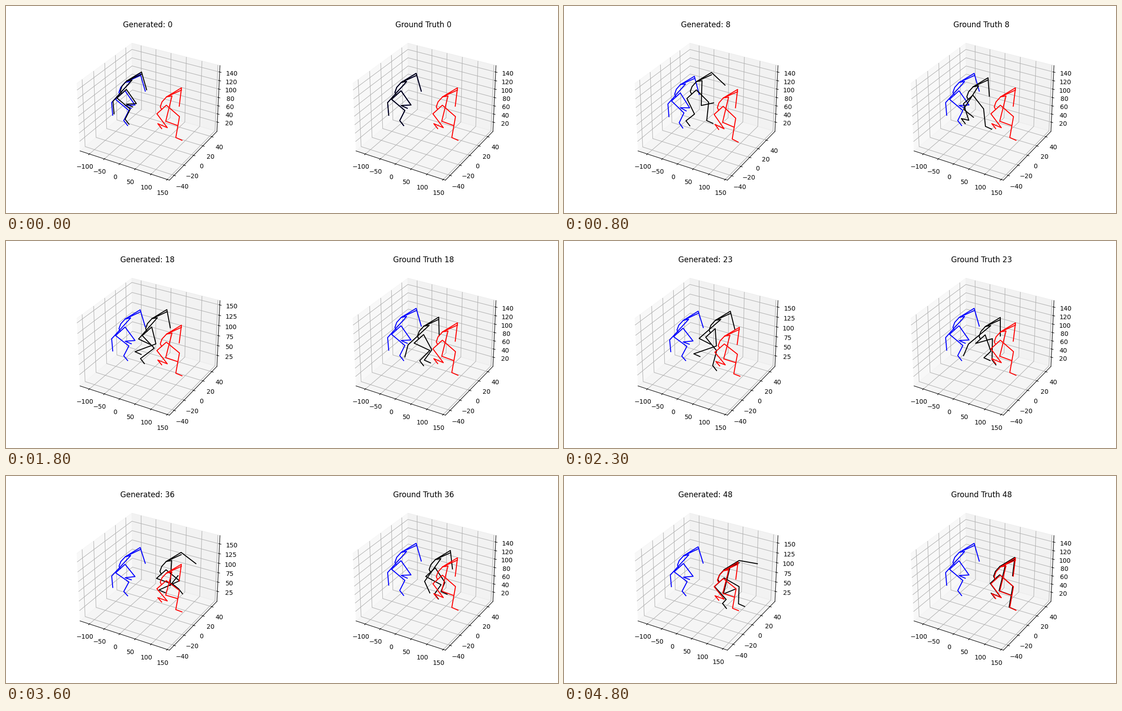
These frames come from a looping animation (1222x458 px, 4.9 s). A matplotlib script:

```python
import numpy as np
import matplotlib.pyplot as plt
from matplotlib.animation import FuncAnimation

W, H, DPI = 1222, 458, 100
SIDE = 0.77 * H
LEFT, BOTTOM = 137.1, 0.11 * H
GAP = 611                      # distance between the two panels
FRAMES, INTERVAL = 49, 100
LAST = FRAMES - 1
KEYS = np.array([0, 8, 13, 23, 30, 42, LAST])

# fixed proportions of the body, in screen pixels
HIP = np.array([10.5, -9.5])
SPINE = np.array([[-3, -6], [1, -17], [11, -28]])
HEAD, ELBOW, SHOULDER = np.array([[33, -15], [33, -20], [12, -2]])
THIGH, FOREARM, UPPER, LOWER = 38.5, 41, 54, 28

# angles in degrees, 0 to the right and 90 down; shins also have a length:
# far thigh, shin, length | near thigh, shin, length | arm, forearm | raised forearm
START = [55, 177, 22, 40, 117, 25, 124, 85, 74]
GEN = np.array([START,
                [45, 96, 41, 64, 142, 24, 79, -12, 43],
                [61, 145, 44, 43, 163, 37, 104, 6, 73],
                [86, 161, 53, 51, 105, 34, 132, 27, 76],
                [84, 175, 48, 23, 59, 29, 118, -27, 77],
                [4, 123, 49, 30, 56, 7, 59, -51, 1],
                [30, 92, 38, 48, 132, 12, 92, -22, 10]])
TRUE = np.array([START,
                 [52, 84, 39, 72, 193, 17, 113, 39, 86],
                 [54, 103, 36, 69, 184, 16, 122, 82, 87],
                 [71, 137, 21, -16, 91, 47, 134, 113, 90],
                 [80, 104, 21, 2, 110, 38, 126, 109, 90],
                 [33, 124, 29, 50, 152, 17, 105, 23, 82],
                 [41, 100, 47, 53, 203, 23, 92, 20, 97]])


def gen_path(n):
    return np.array([256 + 90 * np.sin(np.pi / 2 * n / 42),
                     194 + 41 * (n / LAST) ** 2])


def true_path(n):
    u = n / LAST
    return np.array([253 + 90 * u ** 0.6,
                     197 + 31 * u + 8 * np.sin(2 * np.pi * u ** 1.3)])


def gen_limits(n):
    """Axis limits x0, x1, y0, y1, z0, z1."""
    end = np.interp(n, [42, LAST], [0, 1])
    return [-131.8 - 0.8 * end, 156.6 + 7.4 * end,
            -49.2 - 2.3 * end, np.interp(n, [0, 8, 13], [52, 61.5, 52]),
            np.interp(n, [30, 42], [-3.1, -1.7]),
            np.interp(n, [13, 23, 42, LAST], [155, 166, 173.5, 168.3])]


def true_limits(n):
    return [-131.8, 156.6, -49.2, 52,
            np.interp(n, [23, 30, 42], [-2.8, -3.5, -2.8]), 155]


def smooth(values, t):
    """Cubic Hermite curve through the key poses."""
    slope = np.gradient(values, KEYS, axis=0)
    i = min(np.searchsorted(KEYS, t, side="right") - 1, len(KEYS) - 2)
    d = KEYS[i + 1] - KEYS[i]
    s = (t - KEYS[i]) / d
    ease = 3 * s**2 - 2 * s**3
    return ((1 - ease) * values[i] + ease * values[i + 1]
            + s * (1 - s) * d * ((1 - s) * slope[i] - s * slope[i + 1]))


def polar(angle, length):
    a = np.radians(angle)
    return length * np.array([np.cos(a), np.sin(a)])


def leg(hip, thigh, shin, length, toe):
    knee = hip + polar(thigh, THIGH)
    ankle = knee + polar(shin, length)
    return [hip, knee, ankle, ankle + toe]


def body(root, pose):
    """Four polylines: both legs, spine with head, and the two arms."""
    far = leg(root + HIP, *pose[:3], polar(24, 15))
    near = leg(root - HIP, *pose[3:6], polar(52, 14))
    spine = [root, *(root + SPINE)]
    chest = spine[-1]
    elbow = chest + ELBOW
    low_elbow = chest + polar(pose[6], UPPER)
    return [np.array(line) for line in (
        far[::-1] + [root] + near,
        spine + [chest + HEAD],
        [chest, elbow, elbow + polar(pose[8], FOREARM)],
        [chest, chest + SHOULDER, low_elbow, low_elbow + polar(pose[7], LOWER)])]


class Panel:
    def __init__(self, index, label, path, poses, limits):
        self.dx = index * GAP
        self.label, self.path, self.poses, self.limits = label, path, poses, limits
        self.ax = fig.add_axes(
            [(LEFT + self.dx) / W, BOTTOM / H, SIDE / W, SIDE / H], projection="3d")
        first, self.mover, last = [
            [self.ax.plot([0], [0], [0], color=c)[0] for _ in range(4)]
            for c in ("blue", "black", "red")]
        self.ax.set_xticks(range(-100, 151, 50))
        self.ax.set_yticks(range(-40, 41, 20))
        self.set_limits(0)
        self.place(first, body(true_path(0), TRUE[0]),
                   lambda x: 0.82 * (x - 249))
        self.place(last, body(true_path(LAST) + [1.5, 1], TRUE[-1]),
                   lambda x: 0.5 * (x - 400))

    def set_limits(self, n):
        x0, x1, y0, y1, z0, z1 = self.limits(n)
        self.ax.set(xlim=(x0, x1), ylim=(y0, y1), zlim=(z0, z1))
        pad = (z1 - z0) / 50
        ticks = np.arange(0, 201, 25 if z1 - z0 > 163 else 20)
        self.ax.set_zticks(ticks[(ticks >= z0 + pad) & (ticks <= z1 - pad)])

    def lift(self, point, y):
        """The spot in space at depth y that is seen at a screen point."""
        proj = self.ax.get_proj()
        u, v = self.ax.transData.inverted().transform(
            (point[0] + self.dx, H - point[1]))
        a, b = proj[0] - u * proj[3], proj[1] - v * proj[3]
        x, z = np.linalg.solve([[a[0], a[2]], [b[0], b[2]]],
                               [-a[1] * y - a[3], -b[1] * y - b[3]])
        return x, y, z

    def place(self, lines, shape, depth):
        for line, pts in zip(lines, shape):
            line.set_data_3d(*np.transpose([self.lift(p, depth(p[0])) for p in pts]))

    def show(self, n):
        self.set_limits(n)
        self.place(self.mover, body(self.path(n), smooth(self.poses, n)),
                   lambda x: 0)
        self.ax.set_title(f"{self.label} {n}")


fig = plt.figure(figsize=(W / DPI, H / DPI), dpi=DPI)
panels = [Panel(0, "Generated:", gen_path, GEN, gen_limits),
          Panel(1, "Ground Truth", true_path, TRUE, true_limits)]


def update(n):
    for panel in panels:
        panel.show(n)
    return []


anim = FuncAnimation(fig, update, frames=FRAMES, interval=INTERVAL,
                     init_func=lambda: update(0), blit=False, repeat=True)
plt.show()
```
